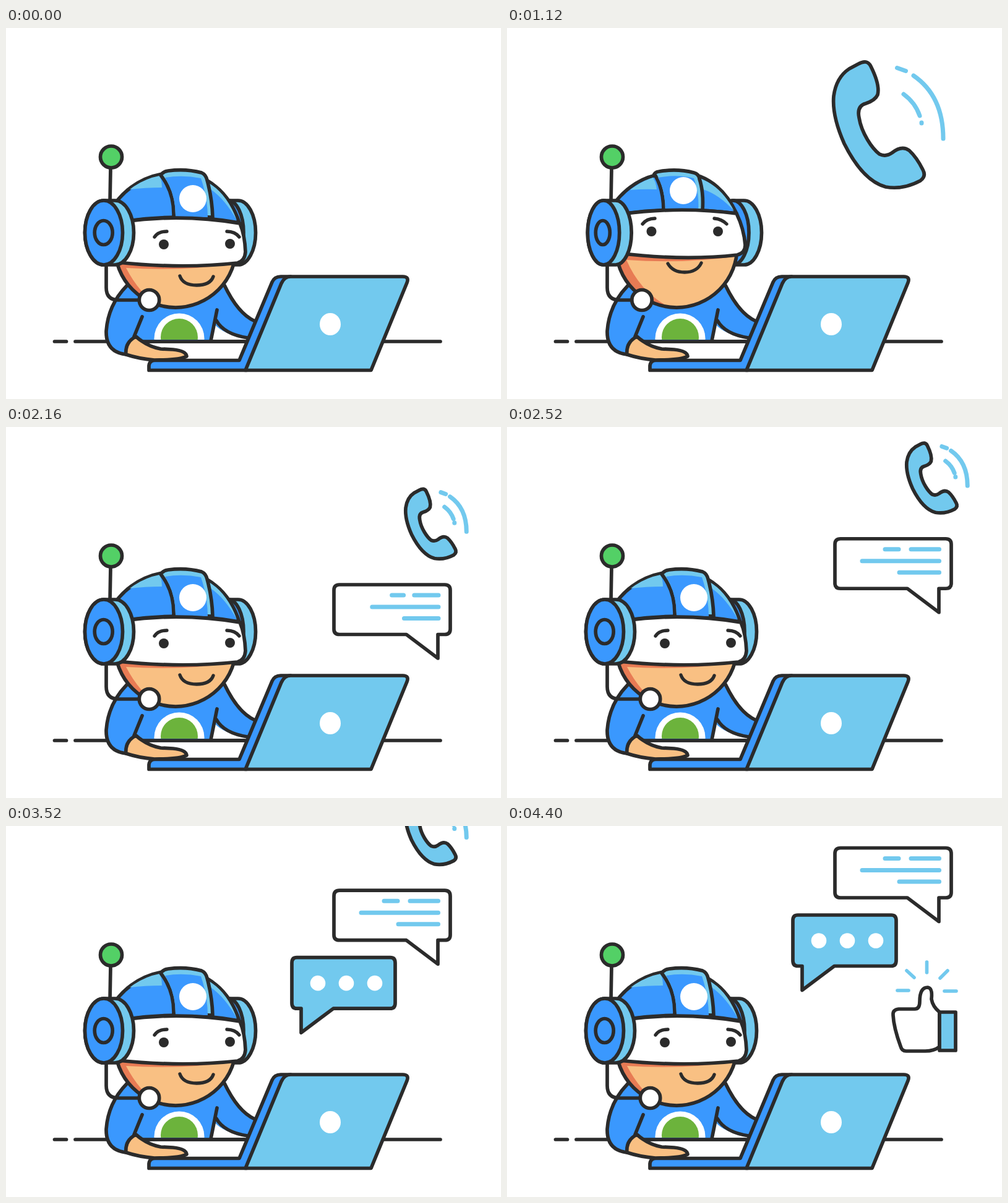
An HTML page that plays this animation: 800 px wide and 600 px high, repeating every 4.6 s.

```html
<!DOCTYPE html>
<html lang="en">
<head>
<meta charset="utf-8">
<title>Support chat</title>
<style>
  html, body { margin: 0; width: 100%; height: 100%; overflow: hidden; background: #fff; }
  svg { display: block; width: 100vw; height: 100vh; }
  .ink { stroke: #2b2b2b; stroke-width: 5.7; stroke-linejoin: round; stroke-linecap: round; fill: none; }
  .thin { stroke-width: 5.3; }
  .line { stroke: #72c9ee; stroke-width: 7; stroke-linecap: round; fill: none; }
  .ray { stroke-width: 5.6; }
  .blue { fill: #3a98fe; }
  .sky { fill: #72c9ee; }
  .skin { fill: #f9c083; }
  .shade { fill: #e87b54; }
  .white { fill: #fff; }
  .green { fill: #53d066; }
  .dark { fill: #2b2b2b; }
  .fixed * { vector-effect: non-scaling-stroke; }
</style>
</head>
<body>
<svg viewBox="0 0 800 600">
  <defs>
    <clipPath id="faceClip"><circle cx="274" cy="354" r="98"/></clipPath>
    <clipPath id="torsoClip"><rect x="200" y="400" width="200" height="104"/></clipPath>
  </defs>

  <path class="ink" d="M78.500 507H97.500M112 507H400M600 507H702"/>

  <g id="body">
    <path class="blue" d="M195 417Q165 448 162 490Q161 524 194 528L212 507H331L336 478Q352 497 390 501L402 474Q375 462 350 414Z"/>
    <path class="ink" d="M195 417Q165 448 162 490Q161 524 194 528M220 467L207 499M341 456L331 506M353 416Q375 462 402 474M340 473Q352 495 390 501"/>
    <g clip-path="url(#torsoClip)">
      <circle class="white" cx="280" cy="502" r="40.500"/>
      <circle cx="280" cy="500" r="30" fill="#6cb33c"/>
    </g>
    <path class="ink" d="M215 507H385"/>
    <path class="ink" d="M169 228L168 282"/>
    <circle class="ink green" cx="170" cy="208.500" r="17.500"/>
  </g>

  <g id="signal" class="green"></g>
  <g id="head"></g>

  <g id="laptop">
    <path class="ink skin" d="M194 528Q192 508 210 499Q228 515 250 519L270 520Q291 522 292 531Q280 537 240 537Q215 535 194 528Z"/>
    <path class="ink blue" d="M231 553.500V546Q232 537.500 241 537.500H377L430 411Q434 402 444 402H460L389 553.500Z"/>
    <path class="ink sky" d="M387 553.500L445 413Q450 402 460 402H641Q652 402 648 412L590 553.500Z"/>
    <ellipse class="white" cx="524" cy="479" rx="17" ry="18"/>
  </g>

  <g id="feed">
    <g id="phone" class="fixed">
      <path class="ink sky" d="M568 58Q582 50 588 62Q603 92 599 108Q595 117 580 122Q565 126 569 145C573 170 590 195 602 204Q612 209 622 202Q638 189 650 198Q662 209 672 229Q678 240 668 247Q640 262 612 257Q575 247 545 187Q525 142 528 110Q532 80 553 66Z"/>
      <path id="waves" class="line" d="M630.500 64.500L644.500 69.500M657 77Q705 110 705 179M641 107Q660 121 667 142M670 153V154"/>
    </g>
    <g id="note" class="fixed">
      <path class="ink white" d="M539 255H709Q718 255 718 264V327Q718 335.500 709 335.500H698V374L647 335.500H539Q530 335.500 530 327V264Q530 255 539 255Z"/>
      <path id="text" class="line" d="M611 272H633M653 272H698.500M574 291H698.500M634 309.500H698.500"/>
    </g>
    <g transform="translate(0 95)">
      <g id="reply" class="fixed">
        <path class="ink sky" d="M470 268.500H621Q629 268.500 629 277V342Q629 351 621 351H529L477 390V351H470Q462 351 462 342V277Q462 268.500 470 268.500Z"/>
        <g id="dots" class="white"></g>
      </g>
    </g>
  </g>

  <g id="thumb" class="fixed">
    <path class="ink white" d="M633 296H659Q667 296 667 284Q667 261 680 261Q688 262 686 280Q688 292 699 301V357Q690 364 676 364H645Q638 364 636 356Q625 326 624 306Q623 297 633 296Z"/>
    <path class="ink sky" d="M699 301H725V363H699Z"/>
  </g>
  <g id="rays"></g>
</svg>

<script>
const LOOP = 4600;
const NS = 'http://www.w3.org/2000/svg';
const $ = id => document.getElementById(id);

function add(parent, tag, attrs) {
  const el = document.createElementNS(NS, tag);
  for (const k in attrs) el.setAttribute(k, attrs[k]);
  return parent.appendChild(el);
}

const clamp = x => Math.max(0, Math.min(1, x));
const span = (t, a, b) => clamp((t - a) / (b - a));
const inOut = x => x < .5 ? 2 * x * x : 1 - 2 * (1 - x) ** 2;
const backOut = x => 1 + 2.2 * (x - 1) ** 3 + 1.2 * (x - 1) ** 2;
const ease = (t, a, b) => inOut(span(t, a, b));
const pop = (t, a, b) => t <= a ? 0 : backOut(span(t, a, b));

const oval = (x, y, rx, ry) =>
  `M${x - rx} ${y}a${rx} ${ry} 0 1 0 ${2 * rx} 0a${rx} ${ry} 0 1 0 ${-2 * rx} 0Z`;
// Two equal ovals joined side by side.
const drum = (x1, x2, y, rx, ry) =>
  `M${x1} ${y - ry}H${x2}A${rx} ${ry} 0 0 1 ${x2} ${y + ry}H${x1}A${rx} ${ry} 0 0 1 ${x1} ${y - ry}Z`;

// Blend two paths that share the same commands.
function mix(a, b, k) {
  const nums = b.match(/-?[\d.]+/g);
  let i = 0;
  return a.replace(/-?[\d.]+/g, n => {
    const v = +n + (nums[i++] - n) * k;
    return Math.round(v * 100) / 100;
  });
}

// Head parts: classes, path looking down, path looking up.
const face = oval(274, 354, 98, 98);
const HEAD = [
  ['ink sky', drum(361, 375, 331, 28.5, 52), drum(366, 383, 331, 28.5, 52)],
  ['ink blue', oval(359, 331, 25, 52), oval(365, 331, 26, 52)],
  ['shade', face, face],
  ['skin', 'M194 388Q285 394 380 380L380 470L262 460Q220 438 194 388Z',
    'M193 375Q285 382 380 368L380 470L282 460Q220 438 193 375Z'],
  ['ink', face, face],
  ['ink blue', 'M176 284Q205 245 252 236L324 246Q362 268 377 315Q285 299 195 312Z',
    'M176 280Q203 247 240 238L312 240Q350 255 371 300Q280 288 190 300Z'],
  ['sky', 'M200 261Q222 244 248 239Q252 246 252 258Q225 258 200 261Z',
    'M199 262Q218 247 236 242Q241 250 242 261Q220 260 199 262Z'],
  ['sky', 'M328 251Q357 268 373 311Q354 277 331 261Z',
    'M314 244Q347 257 367 296Q344 270 317 261Z'],
  ['ink sky', 'M250 238Q254 232 262 231Q290 227 316 234Q323 237 325 246Q333 275 334 306L271 304Q272 266 250 238Z',
    'M237 239Q238 233 246 232Q275 227 302 234Q310 236 311 244Q318 265 316 295L253 295Q253 262 240 239Z'],
  ['blue', 'M257 242Q285 237 315 243Q326 275 326 306L274 305Q274 268 257 242Z',
    'M244 242Q275 236 302 243Q311 268 309 296L256 296Q256 262 244 242Z'],
  ['white', oval(302, 276, 22, 22), oval(285, 263, 22, 22)],
  ['ink white', 'M190 313Q285 300 378 316Q386 335 387 362Q386 377 374 380Q285 390 180 379Z',
    'M185 301Q280 288 371 300Q383 325 385 351Q385 364 372 367Q285 377 180 364Z'],
  ['dark', oval(255, 350, 8, 8), oval(233.5, 329, 8, 8)],
  ['dark', oval(362, 349, 8, 8), oval(341, 329, 8, 8)],
  ['ink thin', 'M240 338Q246 329 260 329M357 329Q370 329 377 338',
    'M219 317Q226 308 239 308M335 308Q347 309 355 317'],
  ['ink', 'M162 385V420Q162 440 182 440H215', 'M162 385V420Q162 440 182 440H202'],
  ['ink white', oval(231.5, 440, 16.2, 16.5), oval(218, 440, 16.2, 16.5)],
  ['ink sky', drum(158, 176, 331, 30.5, 52), drum(156, 175.5, 331, 25.7, 52)],
  ['ink blue', oval(158, 331, 30.5, 52), oval(156, 331, 25.7, 52)],
  ['ink blue', oval(157.7, 331, 14.5, 19.5), oval(154.8, 331, 11.5, 19.5)],
];

const parts = HEAD.map(([cls, down, up]) => {
  const el = add($('head'), 'path', { class: cls });
  if (cls === 'skin') el.setAttribute('clip-path', 'url(#faceClip)');
  return { el, down, up };
});

const SMILE = ['M281 401Q286 416 308 416Q330 416 335 402', 'M260 381Q268 395 287 395Q307 395 314 380'];
const smile = add($('head'), 'path', { class: 'ink thin' });
const talk = add($('head'), 'path', {
  class: 'ink thin white',
  d: 'M289 404Q290 398 308 397.500Q326 398 326 404Q324 422.500 307 422.500Q290 421 289 404Z'
});

const sparks = [[128.5, 190.5], [145.5, 174], [169.5, 169], [192.5, 173], [209.5, 190]]
  .map(([cx, cy]) => add($('signal'), 'circle', { cx, cy }));
const dots = [504, 550, 596].map(cx => add($('dots'), 'circle', { cx, cy: 310 }));
const rays = ['M649 266H631', 'M658 245L646 234', 'M678.500 237V220', 'M700 246L712 234', 'M707 267H726']
  .map(d => add($('rays'), 'path', { d, class: 'line ray', pathLength: 1 }));

const show = (el, on) => el.setAttribute('visibility', on ? 'visible' : 'hidden');

function scaleAt(el, k, x, y, dx = 0, ky = k) {
  show(el, k > .01);
  el.setAttribute('transform', `translate(${x + dx} ${y}) scale(${k} ${ky}) translate(${-x} ${-y})`);
}

function drawHead(t) {
  const up = ease(t, 240, 480) - ease(t, 1160, 1400);
  for (const p of parts) p.el.setAttribute('d', mix(p.down, p.up, up));
  smile.setAttribute('d', mix(...SMILE, up));

  const talking = t >= 2760 && t < 3320;
  const open = .45 + .55 * Math.cos(Math.PI * (t - 3000) / 320) ** 2;
  show(smile, !talking);
  scaleAt(talk, talking ? 1 : 0, 307, 402, 0, open);
}

function drawFeed(t) {
  const ringing = t > 480 && t < 1120;
  const beat = Math.cos(Math.PI * (t - 640) / 320) ** 2;
  sparks.forEach(s => s.setAttribute('r', ringing ? 4.2 * beat : 0));
  $('waves').setAttribute('transform', `translate(${ringing ? 5 * (1 - beat) : 0} 0)`);

  const shrink = 1 - (1 - span(t, 1280, 1680)) ** 1.5;
  scaleAt($('phone'), pop(t, 160, 480) * (1 - .445 * shrink), 601, 157, 85.5 * ease(t, 1280, 1680));

  const scroll = 95 * ease(t, 2280, 2640) + 124.5 * ease(t, 3360, 3700);
  $('feed').setAttribute('transform', `translate(0 ${-scroll})`);

  scaleAt($('note'), pop(t, 1720, 1960), 698, 374);
  scaleAt($('text'), ease(t, 1940, 2240), 702, 291, 0, 1);

  scaleAt($('reply'), pop(t, 2580, 2800), 477, 390);
  dots.forEach((d, i) => d.setAttribute('r', 12.3 * ease(t, 2800 + 130 * i, 2960 + 130 * i)));
}

function drawThumb(t) {
  scaleAt($('thumb'), pop(t, 3660, 3900), 680, 330);
  const len = t < 4160 ? ease(t, 3840, 4040) : ease(t, 4180, 4400);
  for (const r of rays) {
    show(r, len > .02);
    r.setAttribute('stroke-dasharray', `${len} 2`);
  }
}

const start = performance.now();
function frame() {
  const t = (performance.now() - start) % LOOP;
  drawHead(t);
  drawFeed(t);
  drawThumb(t);
  requestAnimationFrame(frame);
}
frame();
</script>
</body>
</html>
```
